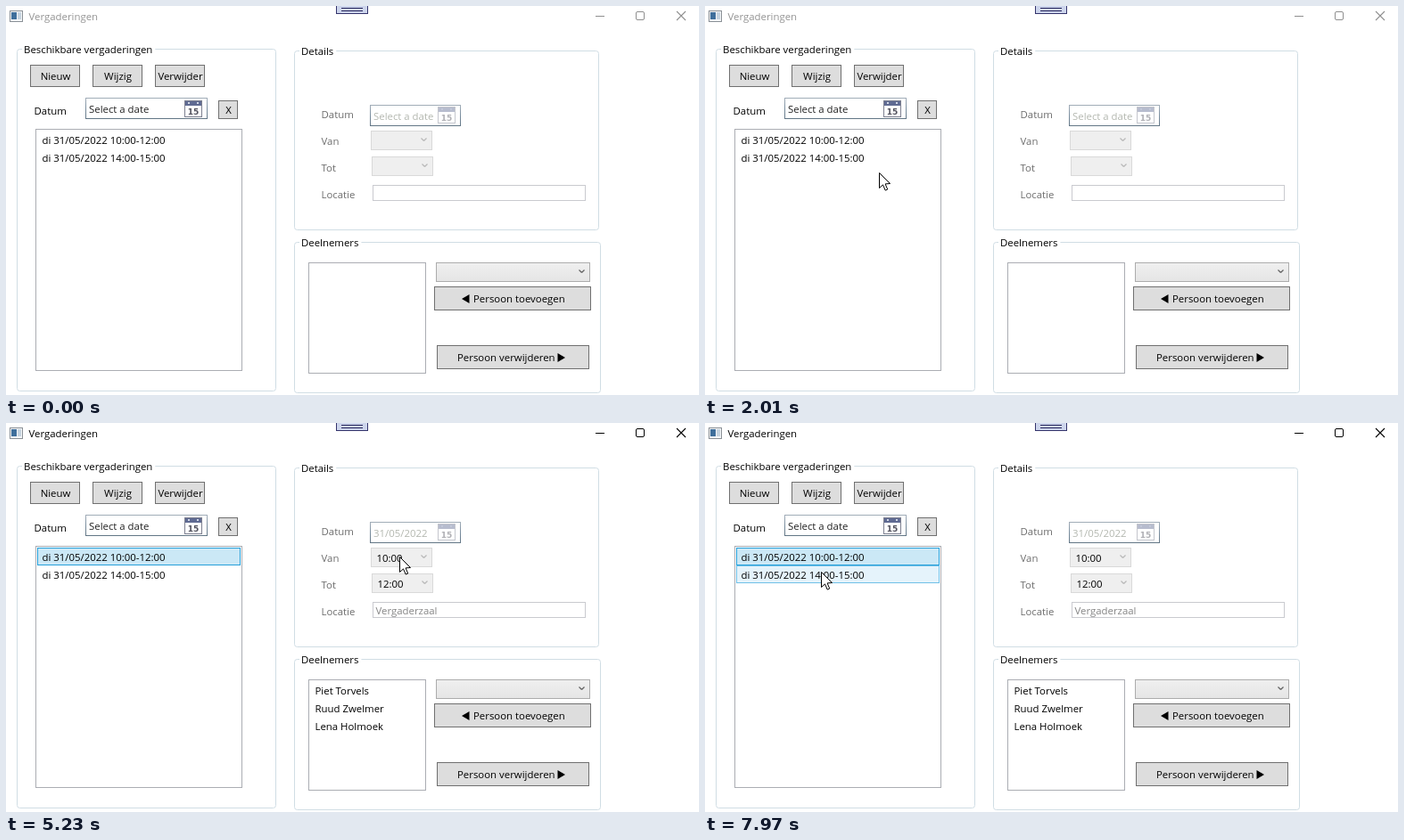
An HTML page with a canvas for the animation above (8000 ms loop, 777 by 437 pixels).

```html
<!DOCTYPE html>
<html lang="nl">
<head>
<meta charset="utf-8">
<title>Vergaderingen</title>
<style>
html, body { margin: 0; width: 100%; height: 100%; overflow: hidden; background: #fff; }
canvas { display: block; }
</style>
</head>
<body>
<canvas id="stage" width="777" height="437"></canvas>
<script>
const ctx = document.getElementById('stage').getContext('2d');
const LOOP = 8000;
const STEP = 1000 / 15;
const FONT = '11.4px "Open Sans", "Noto Sans", sans-serif';
const MEETINGS = ['di 31/05/2022 10:00-12:00', 'di 31/05/2022 14:00-15:00'];
const PEOPLE = ['Piet Torvels', 'Ruud Zwelmer', 'Lena Holmoek'];

// Where the pointer comes to rest: time, x, y
const STOPS = [
  [790, 693, 428], [930, 548, 255], [1470, 62, 14], [1600, 62, 158], [1930, 201, 189],
  [2380, 112, 154], [2600, 109, 149], [2850, 105, 134], [3200, 97, 152], [3867, 97, 152],
  [4700, 441, 130], [4900, 436, 122], [5700, 452, 212], [6190, 392, 333], [6267, 391, 312],
  [6700, 391, 348], [7100, 391, 307], [7350, 391, 306], [7930, 130, 167]
];

const ease = k => k * k * (3 - 2 * k);

function pointerAt(t) {
  if (t < STOPS[0][0]) return null;
  const i = STOPS.findIndex(s => s[0] > t);
  if (i < 0) return STOPS[STOPS.length - 1].slice(1);
  const [t0, x0, y0] = STOPS[i - 1], [t1, x1, y1] = STOPS[i];
  const k = ease((t - t0) / (t1 - t0));
  return [x0 + (x1 - x0) * k, y0 + (y1 - y0) * k];
}

const inside = (p, x, y, w, h) => p && p[0] >= x && p[0] < x + w && p[1] >= y && p[1] < y + h;

function gradient(y, h, ...colors) {
  const g = ctx.createLinearGradient(0, y, 0, y + h);
  colors.forEach((c, i) => g.addColorStop(i / (colors.length - 1), c));
  return g;
}

function box(x, y, w, h, fill, border) {
  ctx.fillStyle = fill;
  ctx.fillRect(x, y, w, h);
  ctx.strokeStyle = border;
  ctx.lineWidth = 1;
  ctx.strokeRect(x + 0.5, y + 0.5, w - 1, h - 1);
}

function label(s, x, y, color = '#000', align = 'left') {
  ctx.font = FONT;
  ctx.fillStyle = color;
  ctx.textAlign = align;
  ctx.fillText(s, x + 0.5, y);
}

function shape(points, fill, stroke) {
  ctx.beginPath();
  points.forEach(([x, y]) => ctx.lineTo(x, y));
  ctx.closePath();
  ctx.fillStyle = fill;
  ctx.fill();
  if (!stroke) return;
  ctx.strokeStyle = stroke;
  ctx.lineWidth = 1;
  ctx.stroke();
}

function lines(color, width, ...segments) {
  ctx.strokeStyle = color;
  ctx.lineWidth = width;
  ctx.beginPath();
  for (const [x1, y1, x2, y2] of segments) {
    ctx.moveTo(x1, y1);
    ctx.lineTo(x2, y2);
  }
  ctx.stroke();
}

function rounded(x, y, w, h, r, color) {
  ctx.strokeStyle = color;
  ctx.lineWidth = 1;
  ctx.beginPath();
  ctx.roundRect(x + 0.5, y + 0.5, w - 1, h - 1, r);
  ctx.stroke();
}

function group(title, x, y, w, h) {
  rounded(x, y, w, h, 3, '#d0dde4');
  ctx.font = FONT;
  ctx.fillStyle = '#fff';
  ctx.fillRect(x + 6, y - 2, ctx.measureText(title).width + 5, 5);
  label(title, x + 7.5, y + 5);
}

function button(s, x, y, w, h, hot) {
  box(x, y, w, h, hot ? '#bee6fd' : '#dddddd', hot ? '#3c7fb1' : '#707070');
  label(s, x + w / 2, y + h / 2 + 4.5, '#000', 'center');
}

function triangle(x, y, dir) {
  shape([[x, y], [x - dir * 8.5, y - 5], [x - dir * 8.5, y + 5]], '#000');
}

function combo(s, x, y, w, h, enabled) {
  box(x, y, w, h, enabled ? gradient(y, h, '#f0f0f0', '#e5e5e5') : '#efefef', enabled ? '#acacac' : '#d9d9d9');
  const ax = x + w - 9.5, ay = y + 11.5;
  const ink = enabled ? '#606060' : '#b8b8b8';
  lines(ink, 1.2, [ax - 3, ay - 3, ax, ay], [ax, ay, ax + 3, ay - 3]);
  label(s, x + 6, y + 16);
}

function calendar(x, y) {
  box(x, y, 20, 19, '#fff', '#7d8090');
  ctx.fillStyle = '#5f6a92';
  ctx.fillRect(x + 1, y + 1, 18, 5);
  ctx.fillStyle = '#cfd5e4';
  ctx.fillRect(x + 4, y + 2, 2, 2);
  ctx.fillRect(x + 14, y + 2, 2, 2);
  ctx.font = 'bold 9px "DejaVu Sans", sans-serif';
  ctx.fillStyle = '#50505c';
  ctx.textAlign = 'center';
  ctx.fillText('15', x + 10, y + 16);
}

function datePicker(s, x, y, w, calX, calY, enabled) {
  box(x, y, w, 24, '#fff', gradient(y, 24, '#a3aeb9', '#7a8e9f', '#617584'));
  label(s, x + 3.5, y + 17, enabled ? '#222' : '#b4b8b0');
  ctx.globalAlpha = enabled ? 1 : 0.45;
  calendar(calX, calY);
  ctx.globalAlpha = 1;
}

function list(items, x, y, w, h, hover, selected) {
  box(x, y, w, h, '#fff', '#abadb3');
  items.forEach((s, i) => {
    const top = y + 2 + i * 20;
    if (i === selected) box(x + 2, top, w - 4, 20, '#cbe8f6', '#26a0da');
    else if (i === hover) box(x + 2, top, w - 4, 20, '#e5f3fb', '#70c0e7');
    label(s, x + 7, top + 15);
  });
}

function rowUnder(p, x, y, w, n) {
  return inside(p, x, y, w, n * 20) ? Math.floor((p[1] - y) / 20) : -1;
}

function titleBar(active) {
  const ink = active ? '#000' : '#8f8f8f';
  box(4, 5, 15, 13, '#f4f6f8', '#8a9096');
  ctx.fillStyle = '#3f6f9c';
  ctx.fillRect(6, 7, 6, 8);
  ctx.fillStyle = '#c6d3df';
  ctx.fillRect(13, 7, 4, 8);
  label('Vergaderingen', 25, 16, active ? '#000' : '#949494');

  box(370, -3, 36, 12, '#cdd5ec', '#34346c');
  lines('#26265c', 1, [376, 2.5, 400, 2.5], [376, 5.5, 400, 5.5]);

  lines(ink, 1, [661, 11.5, 671, 11.5]);
  rounded(706, 6, 10, 10, 1.5, ink);
  lines(ink, 1.1, [752, 6, 762, 16], [762, 6, 752, 16]);
}

function pointer([x, y]) {
  ctx.save();
  ctx.translate(Math.round(x) + 0.5, Math.round(y) + 0.5);
  shape([[0, 0], [0, 17], [4, 13.4], [6.7, 19.6], [9.2, 18.5], [6.6, 12.4], [12, 12]], '#fff', '#000');
  ctx.restore();
}

function draw(t) {
  const now = Math.floor((t + 10) / STEP) * STEP;
  const spot = pointerAt(now);
  const felt = pointerAt(now - STEP); // hover trails the pointer by one step
  const filled = t >= 3900;

  ctx.fillStyle = '#fff';
  ctx.fillRect(0, 0, 777, 437);
  titleBar(t >= 3680);

  group('Beschikbare vergaderingen', 12, 48, 291, 385);
  ['Nieuw', 'Wijzig', 'Verwijder'].forEach((s, i) => {
    const x = 27 + i * 70;
    button(s, x, 66, 56, 25, inside(felt, x, 66, 56, 25));
  });
  label('Datum', 31, 122);
  datePicker('Select a date', 89, 103, 137, 200, 106, true);
  button('X', 238, 106, 22, 21);
  list(MEETINGS, 33, 138, 232, 272, rowUnder(felt, 35, 140, 228, 2), t >= 3760 ? 0 : -1);

  group('Details', 323, 50, 342, 202);
  ['Datum', 'Van', 'Tot', 'Locatie'].forEach((s, i) => label(s, 353, 126 + i * 30, '#6d6d6d'));
  datePicker(filled ? '31/05/2022' : 'Select a date', 408, 111, 102, 484, 113, false);
  combo(filled ? '10:00' : '', 409, 140, 69, 22, false);
  combo(filled ? '12:00' : '', 410, 169, 69, 22, false);
  box(411, 201, 239, 18, '#fff', '#c9cacf');
  if (filled) label('Vergaderzaal', 414, 215, '#858585');

  group('Deelnemers', 323, 265, 344, 170);
  list(filled ? PEOPLE : [], 339, 288, 132, 125, rowUnder(felt, 341, 290, 128, 3), -1);
  combo('', 482, 288, 173, 22, true);
  button('', 480, 315, 176, 27);
  triangle(511, 329, -1);
  label('Persoon toevoegen', 523.5, 333);
  button('', 483, 381, 171, 27);
  label('Persoon verwijderen', 505.5, 399);
  triangle(627, 395, 1);

  if (spot) pointer(spot);
}

const began = performance.now();
function tick() {
  draw((performance.now() - began) % LOOP);
  requestAnimationFrame(tick);
}
tick();
</script>
</body>
</html>
```
